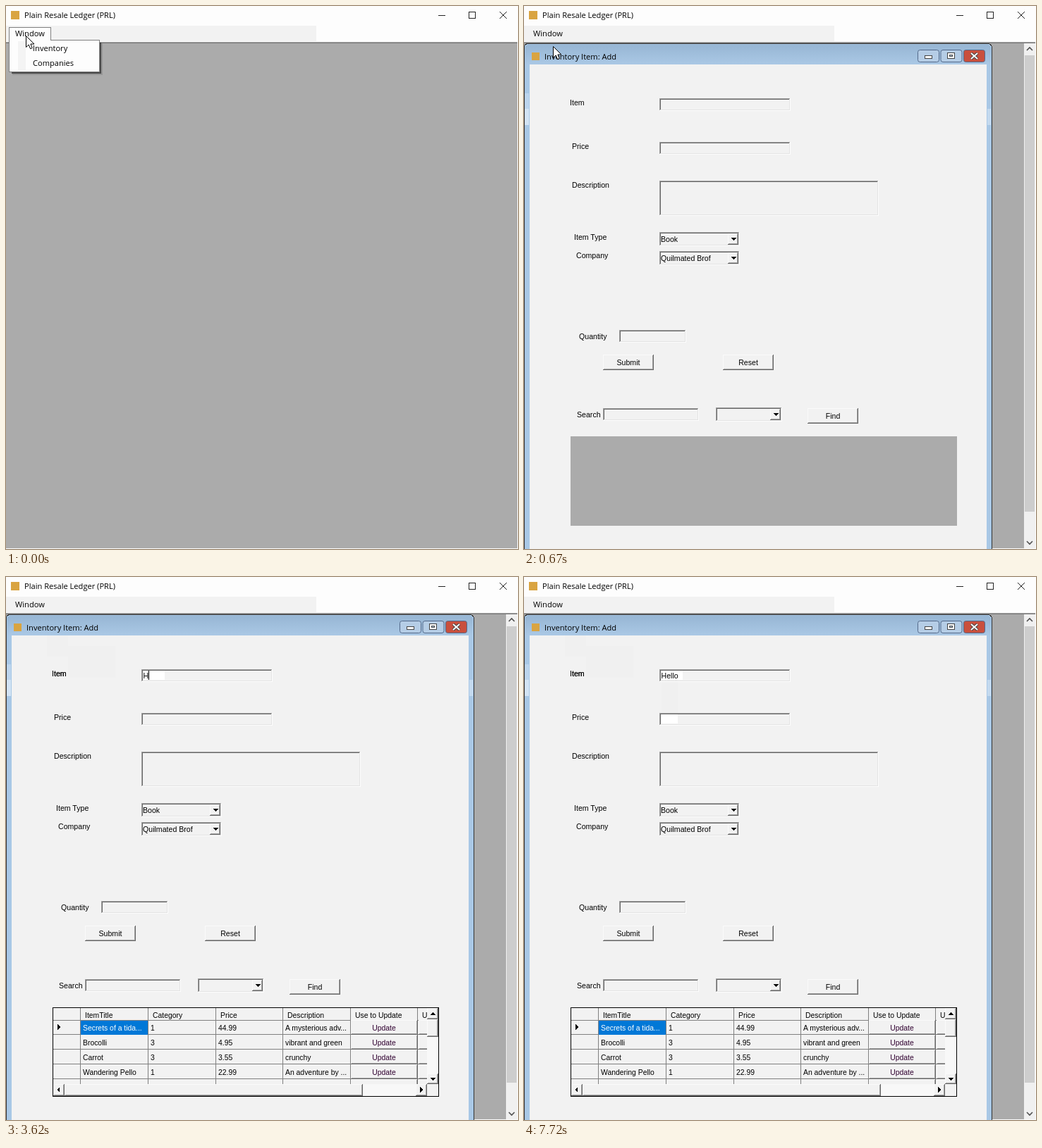
An HTML page for the animation above (8 s loop, 726 by 771 pixels).

```html
<!DOCTYPE html>
<html lang="en">
<head>
<meta charset="utf-8">
<title>Store form</title>
<style>
html, body { margin: 0; width: 100%; height: 100%; overflow: hidden; background: #fdfdfd; }
svg { display: block; width: 726px; height: 771px; shape-rendering: crispEdges; }
text { font: 10.6px "Liberation Sans", Arial, sans-serif; white-space: pre; }
.ui { font: 11.1px "Open Sans", "Noto Sans", sans-serif; }
.cell { font-size: 10.4px; }
.mid { text-anchor: middle; }
.soft { shape-rendering: auto; }
</style>
</head>
<body>
<svg id="stage" viewBox="0 0 726 771"></svg>
<script>
const LOOP = 8000, GREY = '#ababab', FACE = '#f2f2f2';

// Drawing helpers; all return markup
const rect = (x, y, w, h, fill, more = '') =>
  `<rect x="${x}" y="${y}" width="${w}" height="${h}" fill="${fill}" ${more}/>`;
const frame = (x, y, w, h, fill, line, more = '') =>
  rect(x + .5, y + .5, w - 1, h - 1, fill, `stroke="${line}" ${more}`);
const text = (x, y, s, cls = '', fill = '#000') =>
  `<text x="${x}" y="${y}" class="${cls}" fill="${fill}">${s}</text>`;
const path = (d, fill = 'none', line = 'none', more = '') =>
  `<path d="${d}" fill="${fill}" stroke="${line}" ${more}/>`;
const group = (id, ...parts) => `<g id="${id}">${parts.join('')}</g>`;
const block = ([x, y, w, h]) => rect(x, y, w, h, GREY);

const bevel = (x, y, w, h, fill, [a, b, c, d]) =>
  rect(x, y, w, h, d) + rect(x, y, w - 1, h - 1, a) +
  rect(x + 1, y + 1, w - 2, h - 2, c) + rect(x + 1, y + 1, w - 3, h - 3, b) +
  rect(x + 2, y + 2, w - 4, h - 4, fill);
const sunken = (x, y, w, h, fill = FACE) =>
  bevel(x, y, w, h, fill, ['#a0a0a0', '#696969', '#e3e3e3', '#fdfdfd']);
const raised = (x, y, w, h) =>
  bevel(x, y, w, h, FACE, ['#fafafa', FACE, '#a0a0a0', '#696969']);
const arrow = (x, y, dx, dy) => path(dx
  ? `M${x - 2 * dx} ${y - 4}V${y + 4}L${x + 2 * dx} ${y}Z`
  : `M${x - 4} ${y - 2 * dy}H${x + 4}L${x} ${y + 2 * dy}Z`, '#000');
const button = (x, y, w, h, label) => raised(x, y, w, h) + text(x + w / 2, y + h / 2 + 4, label, 'mid');
const combo = (x, y, w, label) =>
  sunken(x, y, w, 20) + raised(x + w - 17, y + 2, 15, 16) +
  arrow(x + w - 9, y + 10, 0, 1) + text(x + 2, y + 13.5, label);

// Main window
const shell = () =>
  rect(0, 0, 726, 771, '#fdfdfd') + rect(7, 7, 12, 12, '#d9a441') +
  text(26, 17, 'Plain Resale Ledger (PRL)', 'ui') +
  path('M613 13.5H623', 'none', '#222') + frame(656, 8, 10, 10, 'none', '#222') +
  path('M700 8L710 18M710 8L700 18', 'none', '#222', 'class="soft"') +
  rect(0, 28, 440, 22, '#f2f2f2') + rect(0, 51, 725, 1, '#a0a0a0') +
  rect(0, 52, 725, 1, '#787878') + rect(0, 53, 725, 717, GREY);

const menu = () =>
  rect(9, 53, 128, 45, '#000', 'opacity=".12"') + rect(8, 52, 127, 44, '#000', 'opacity=".5"') +
  frame(4, 48, 129, 46, '#fdfdfd', '#808080') + rect(17, 50, 11, 42, '#f4f4f4') +
  path('M4.5 49V30.5H63.5V49', '#fdfdfd', '#808080') + rect(5, 48, 58, 2, '#fdfdfd') +
  group('hover', frame(6, 50, 125, 21, '#b3d7f3', '#0078d7')) +
  text(38, 64, 'Inventory', 'ui') + text(38, 85, 'Companies', 'ui');

// Child window
const caption = (x, fill, line, icon) =>
  frame(x, 62, 31, 18, fill, line, 'rx="3" class="soft"') + icon;
const child = (active) => {
  const line = active ? '#53698a' : '#73879c', fill = active ? '#b5cde6' : '#c4d4e3';
  const glyph = active ? '#fff' : '#e8eef4';
  return path('M.5 771V59Q.5 53.5 6 53.5H657Q663.5 53.5 663.5 60V771', active ? '#a9c8e6' : '#d7e4f2', '#333') +
    path('M2 83V60Q2 55 7 55H656Q662 55 662 60V83Z', active ? 'url(#on)' : 'url(#off)') +
    rect(8, 83, 648, 688, active ? FACE : '#f0f0f0') +
    caption(558, fill, line, frame(568, 70, 11, 5, glyph, '#444')) +
    caption(590.5, fill, line, frame(600, 66, 11, 9, glyph, '#444') + frame(603, 69, 5, 3, fill, '#444')) +
    caption(623, active ? '#c94f3d' : fill, line,
      path('M634 67L643 75M643 67L634 75', 'none', '#444', 'stroke-width="4" class="soft"') +
      path('M634 67L643 75M643 67L634 75', 'none', '#fff', 'stroke-width="2" class="soft"')) +
    text(29, 75.5, 'Inventory Item: Add', 'ui', active ? '#000' : '#999');
};

const inputs = [[192, 131, 186, 18], [192, 193, 186, 18], [135, 460, 95, 18], [112, 571, 136, 18]];
const notes = [192, 248, 311, 50];
const blanks = [
  [63, 130, 25, 17], [66, 192, 29, 17], [66, 247, 59, 17], [69, 321, 52, 16], [72, 348, 51, 16],
  [76, 462, 44, 17], [73, 573, 38, 17], [192, 321, 116, 20], [192, 348, 116, 20],
  [112, 495, 72, 22], [282, 495, 72, 22], [272, 570, 96, 20], [402, 571, 72, 22], [66, 611, 548, 127]];

const loading = () =>
  child(false) + frame(9, 65, 15, 12, '#fdfdfd', '#8795a3') + rect(11, 68, 6, 7, '#3c8a78') +
  blanks.map(block).join('') + inputs.map(f => sunken(...f, GREY)).join('') +
  sunken(...notes, '#fdfdfd');

const labels = [[65, 141, 'Item'], [68, 203, 'Price'], [68, 258, 'Description'], [71, 332, 'Item Type'],
  [74, 358, 'Company'], [78, 473, 'Quantity'], [75, 584, 'Search']];

const form = () =>
  child(true) + rect(1, 124, 6, 45, '#bcd5ed') + rect(1, 146, 6, 23, '#d3e4f4') +
  rect(657, 146, 5, 23, '#c4daef') + rect(11, 66, 11, 11, '#d9a441') +
  inputs.map(f => sunken(...f)).join('') + sunken(...notes) +
  labels.map(l => text(...l)).join('') +
  combo(192, 321, 114, 'Book') + combo(192, 348, 114, 'Quilmated Brof') + combo(272, 570, 94, '') +
  button(112, 495, 72, 22, 'Submit') + button(282, 495, 72, 22, 'Reset') + button(402, 571, 72, 22, 'Find') +
  block(blanks[13]) +
  rect(709, 53, 16, 717, '#f0f0f0') + rect(710, 70, 14, 648, '#cdcdcd') +
  path('M713 63L717 59L721 63M713 760L717 764L721 760', 'none', '#505050', 'stroke-width="1.6" class="soft"');

// Data grid
const cols = [106, 202, 298, 393, 489, 584];
const heads = ['ItemTitle', 'Category', 'Price', 'Description', 'Use to Update', 'U'];
const rows = [
  ['Secrets of a tida...', '1', '44.99', 'A mysterious adv...'],
  ['Brocolli', '3', '4.95', 'vibrant and green'],
  ['Carrot', '3', '3.55', 'crunchy'],
  ['Wandering Pello', '1', '22.99', 'An adventure by ...'],
  ['Wandering Pe...', '1', '25.99', 'An adventure by ...']];

const gridRow = (cells, i) => {
  const y = 629 + 21 * i;
  return rect(67, y + 20, 530, 1, '#808080') + (i ? '' : rect(106, y + 1, 95, 20, '#0078d7')) +
    cells.map((s, c) => text(cols[c] + 3, y + 15, s, 'cell', i || c ? '#000' : '#fff')).join('') +
    raised(489, y, 95, 21) + text(536, y + 15, 'Update', 'cell mid', '#300030') + raised(585, y, 95, 21);
};

const grid = () =>
  rect(66, 611, 548, 127, FACE) +
  `<g clip-path="url(#gridClip)">` +
  cols.map((x, c) => rect(x - 1, 612, 1, 108, '#808080') + text(x + 6, 625.5, heads[c], 'cell')).join('') +
  rect(67, 629, 530, 1, '#808080') + rows.map(gridRow).join('') + arrow(75, 639, 1, 0) + '</g>' +
  rect(597, 612, 16, 108, '#f8f8f8') + raised(597, 612, 16, 16) + raised(597, 628, 16, 25) +
  raised(597, 705, 16, 15) + arrow(605, 620, 0, -1) + arrow(605, 713, 0, 1) +
  rect(67, 720, 530, 17, '#f8f8f8') + raised(67, 720, 16, 17) + raised(83, 720, 423, 17) +
  raised(581, 720, 16, 17) + arrow(74, 728, -1, 0) + arrow(589, 728, 1, 0) +
  frame(66, 611, 548, 127, 'none', '#000');

const stage = document.getElementById('stage');
const fade = (id, a, b) => `<linearGradient id="${id}" x2="0" y2="1">
  <stop stop-color="${a}"/><stop offset="1" stop-color="${b}"/></linearGradient>`;
stage.innerHTML =
  `<defs>${fade('on', '#97b6d4', '#aac8e5')}${fade('off', '#b8c8d8', '#d2e0ed')}
  <clipPath id="gridClip"><rect x="67" y="612" width="530" height="108"/></clipPath></defs>` +
  shell() + group('menu', menu()) + text(13, 43, 'Window', 'ui') +
  group('loading', loading()) + group('form', form()) + group('grid', grid()) +
  group('trail1', rect(58, 83, 30, 30, '#f0f0f0')) +
  group('trail2', rect(88, 98, 67, 45, '#f0f0f0'), text(65, 141, 'Item')) +
  group('itemFill', rect(194, 133, 31, 13, '#fff')) +
  group('priceFill', rect(195, 149, 23, 44, '#f0f0f0'), rect(194, 195, 24, 13, '#fff')) +
  text(194.5, 143.5, '').replace('<text', '<text id="typed"') +
  rect(194, 133, 1, 13, '#000', 'id="caret"') +
  group('pointer', path('M.5 .5V16.5L4.2 13L6.6 18.7L9.3 17.5L6.9 12H12Z', '#fff', '#000', 'class="soft"')) +
  group('beam', path('M0 .5H3M4 .5H7M0 14.5H3M4 14.5H7M3.5 1V14', 'none', '#000'));

// Time tables: [start, value...]
const pointerAt = [[0, 28, 42], [150, 34, 50], [270, 41, 57], [820, 58, 83], [940, 78, 98], [1090, 143, 124]];
const beamAt = [[1210, 208, 129], [1360, 218, 131]];
const typedAt = [[0, 0], [3620, 1], [3740, 2], [3890, 3], [4010, 4], [4130, 5], [4380, 4], [4630, 3],
  [4750, 2], [4870, 1], [5580, 3], [5700, 4], [5850, 5]];
const caretOn = [[1880, 2500], [3030, 5430], [5580, 6690], [7190, 7720]];
const caretX = [194, 202, 207, 210, 212, 217];

const $ = id => document.getElementById(id);
const latest = (list, t) => list.filter(k => k[0] <= t).pop() || list[0];
const show = (id, on) => $(id).style.display = on ? '' : 'none';
const place = (id, list, t) => {
  const [, x, y] = latest(list, t);
  $(id).setAttribute('transform', `translate(${x} ${y})`);
};

function draw(t) {
  show('menu', t < 550);
  show('hover', t >= 150);
  show('loading', t >= 550 && t < 670);
  show('form', t >= 670);
  show('grid', t >= 820);
  show('trail1', t >= 940);
  show('trail2', t >= 1210);
  show('itemFill', t >= 1360);
  show('priceFill', t >= 6100);
  show('pointer', t < 1210);
  show('beam', t >= 1210 && t < 3620);
  place('pointer', pointerAt, t);
  place('beam', beamAt, t);

  const n = latest(typedAt, t)[1], price = t >= 6100;
  $('typed').textContent = 'Hello'.slice(0, n);
  show('caret', caretOn.some(([a, b]) => t >= a && t < b));
  $('caret').setAttribute('x', price ? 194 : caretX[n]);
  $('caret').setAttribute('y', price ? 195 : 133);
}

const start = performance.now();
function tick() {
  draw((performance.now() - start) % LOOP);
  requestAnimationFrame(tick);
}
tick();
</script>
</body>
</html>
```
